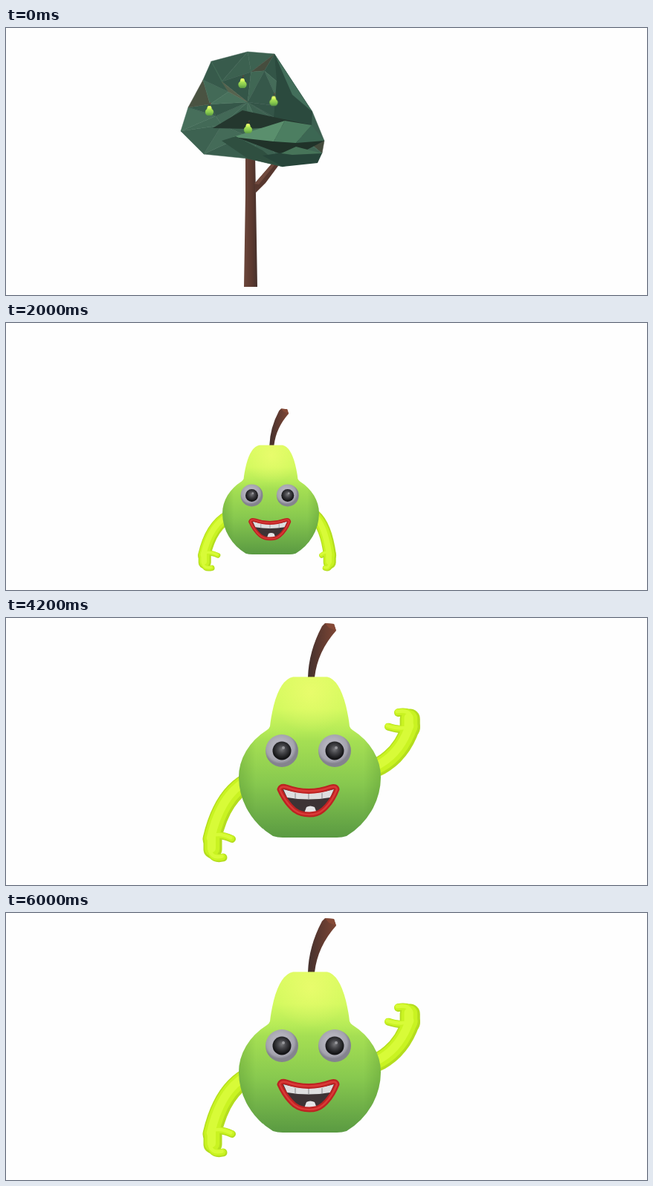
These frames come from a looping animation (862 px wide and 360 px high, 6200 ms). An HTML page:

```html
<!DOCTYPE html>
<html lang="en">
<head>
<meta charset="utf-8">
<title>Pear</title>
<style>
html, body { margin: 0; width: 100%; height: 100%; overflow: hidden; background: #fefefe; }
svg { display: block; width: 862px; height: 360px; }
.arm { fill: none; stroke-linecap: round; stroke-linejoin: round; }
</style>
</head>
<body>
<svg viewBox="0 0 862 360">
  <defs>
    <linearGradient id="skin" gradientUnits="userSpaceOnUse" x1="0" y1="79" x2="0" y2="296">
      <stop offset="0" stop-color="#d9fb60"/>
      <stop offset=".2" stop-color="#d2f95e"/>
      <stop offset=".34" stop-color="#b5ea57"/>
      <stop offset=".4" stop-color="#a5df53"/>
      <stop offset=".66" stop-color="#88c94f"/>
      <stop offset="1" stop-color="#5a9a42"/>
    </linearGradient>
    <linearGradient id="edge" gradientUnits="userSpaceOnUse" x1="313" y1="0" x2="504" y2="0">
      <stop offset="0" stop-color="#3d7a20" stop-opacity=".25"/>
      <stop offset=".12" stop-color="#3d7a20" stop-opacity="0"/>
      <stop offset=".88" stop-color="#3d7a20" stop-opacity="0"/>
      <stop offset="1" stop-color="#3d7a20" stop-opacity=".25"/>
    </linearGradient>
    <radialGradient id="glow" gradientUnits="userSpaceOnUse" cx="410" cy="100" r="55">
      <stop offset="0" stop-color="#f4fd74" stop-opacity=".6"/>
      <stop offset="1" stop-color="#f4fd74" stop-opacity="0"/>
    </radialGradient>
    <linearGradient id="wood">
      <stop offset="0" stop-color="#43302d"/>
      <stop offset=".45" stop-color="#5f3a30"/>
      <stop offset="1" stop-color="#7d4635"/>
    </linearGradient>
    <linearGradient id="bark">
      <stop offset="0" stop-color="#6b463b"/>
      <stop offset=".6" stop-color="#5b392f"/>
      <stop offset="1" stop-color="#44302b"/>
    </linearGradient>
    <radialGradient id="white" cx=".45" cy=".4">
      <stop offset=".5" stop-color="#b3b2bc"/>
      <stop offset=".85" stop-color="#a3a2ad"/>
      <stop offset="1" stop-color="#84838e"/>
    </radialGradient>
    <radialGradient id="pupil" cx=".5" cy=".42">
      <stop offset="0" stop-color="#77777a"/>
      <stop offset=".45" stop-color="#444448"/>
      <stop offset="1" stop-color="#151517"/>
    </radialGradient>
    <path id="body" d="M386 79.5H432Q448 83 457 118Q461 135 462 146Q463 149 466 151A95.5 80 0 0 1 504 215A95.5 94 0 0 1 458 294Q452 296 445 296H372Q365 296 359 294A95.5 94 0 0 1 313 215A95.5 80 0 0 1 351 151Q354 149 355 146Q356 135 360 118Q369 83 386 79.5Z"/>
    <path id="lips" d="M368 231Q370 226 377 228Q407 239 437 228Q444 226 445 231Q438 249 426 259Q419 265 408 265Q396 265 388 259Q376 249 368 231Z"/>
    <g id="pear" transform="translate(-408.5 -296)">
      <path d="M406 80Q407 45 425 11L429 7L441 8L444 17Q419 45 415 80Z" fill="url(#wood)"/>
      <path d="M429 7L441 8L444 17L434 13Z" fill="#854936"/>
      <use href="#body" fill="url(#skin)"/>
      <use href="#body" fill="url(#edge)"/>
      <use href="#body" fill="url(#glow)"/>
    </g>
    <g id="eye">
      <circle r="22" fill="url(#white)"/>
      <circle r="12.5" fill="url(#pupil)"/>
      <circle cx="2" cy="-4" r="2" fill="#98989c"/>
    </g>
  </defs>

  <g id="tree">
    <path d="M322 170H335L336 225L338 349H320L322 225Z" fill="url(#bark)"/>
    <path d="M334 210L360 180L369 182L349 209L336 222Z" fill="#57372e"/>
    <path d="M334 210L360 180L364 181L340 211Z" fill="#70493d"/>
    <g id="crown"></g>
    <path d="M361 35L412 113L411 131L360 123L364 70Z" fill="#2b4a3e"/>
    <path d="M361 35L412 113L385 90Z" fill="#426e5a"/>
    <path d="M278 135L318 111L411 131L325 136Z" fill="#24372e"/>
    <path d="M309 147L360 150L428 152L405 164L370 170Z" fill="#203229"/>
    <path d="M305 147L375 125L360 153Z" fill="#5a8f6d"/>
    <path d="M375 125L411 131L390 155L360 153Z" fill="#4c7e61"/>
    <path d="M411 131L428 152L390 155Z" fill="#3c6753"/>
    <path d="M290 152L309 146L345 165L372 187L325 176Z" fill="#2f4f40"/>
    <path d="M345 172L372 168L425 169L419 182L372 187Z" fill="#27453a"/>
    <path d="M370 169L390 160L425 169L385 171Z" fill="#477459"/>
    <use href="#pear" transform="translate(318 81) scale(.06)"/>
    <use href="#pear" transform="translate(273.5 118) scale(.06)"/>
    <use href="#pear" transform="translate(325.5 142) scale(.06)"/>
  </g>

  <g id="hero">
    <g id="arms" class="alive arm" transform="translate(-408.5 -296)"></g>
    <use href="#pear"/>
    <g class="alive" transform="translate(-408.5 -296)">
      <use href="#eye" x="371" y="179"/>
      <use href="#eye" x="442" y="179"/>
      <use href="#lips" fill="#3d3335"/>
      <path d="M373 231Q407 241 441 231L436 242Q407 247 378 242Z" fill="#dededf"/>
      <path d="M389 236V244M407 237V245M425 236V244" stroke="#88878a"/>
      <path d="M401 263L404 255Q409 252 415 255L418 263Z" fill="#e4e4e6"/>
      <use href="#lips" fill="none" stroke="#bd2222" stroke-width="7" stroke-linejoin="round"/>
      <use href="#lips" fill="none" stroke="#d93a37" stroke-width="2.5"/>
    </g>
  </g>
</svg>
<script>
const $ = id => document.getElementById(id);
const LOOP = 6200, STEP = 200;

const mix = (a, b, u) => a + (b - a) * u;
const ramp = (t, from, to) => Math.min(1, Math.max(0, (t - from) / (to - from)));
const smooth = u => u * u * (3 - 2 * u);

let seed = 5;
const rand = () => (seed = seed * 16807 % 2147483647) / 2147483647;

// Crown: triangles between the outline, a jittered inner ring and the centre
function drawCrown() {
  const outer = '276,45 325,32 361,35 412,113 428,152 425,169 372,187 325,176 266,170 235,139 245,107 265,70'
    .split(' ').map(p => p.split(',').map(Number));
  const hub = [325, 100];
  const inner = outer.map(p => p.map((v, k) => mix(hub[k], v, .55) + rand() * 16 - 8));
  const facet = (...pts) => {
    const x = pts.reduce((sum, p) => sum + p[0], 0) / 3;
    const u = .75 * rand() + .25 * ramp(x, 400, 240), warm = rand() < .25 ? 14 : 0;
    const c = `rgb(${mix(46, 76, u) + warm},${mix(78, 118, u) - warm},${mix(66, 96, u) - warm})`;
    return `<polygon points="${pts.join(' ')}" fill="${c}" stroke="${c}" stroke-width=".5"/>`;
  };
  $('crown').innerHTML = outer.map((a, i) => {
    const j = (i + 1) % outer.length;
    return facet(a, outer[j], inner[i]) + facet(outer[j], inner[j], inner[i]) + facet(inner[i], inner[j], hub);
  }).join('');
}

// side: -1 left, 1 right; spread: reach outwards; drop: 1 hangs, -1 points up
function arm(side, spread, drop) {
  const at = (x, y) => [408.5 + side * (95.5 + x * spread), 212 + y * drop];
  const near = 1 - Math.abs(drop);
  const parts = [
    [`M${at(-18, 6)}Q${at(22, 24)} ${at(36, 86)}`, 25],
    [`M${at(35, 84)}L${at(35, 100)}`, 25 + 9 * near],
    [`M${at(30, 82)}Q${at(22, 80)} ${at(9, 86)}`, 10],
    [`M${at(37, 104)}Q${at(34, 114)} ${at(21, 111)}`, 11],
  ];
  const layer = (color, thin, shift) => parts.map(([d, w]) =>
    `<path d="${d}" stroke="${color}" stroke-width="${w * thin}" transform="translate(${shift} ${shift})"/>`).join('');
  return layer('#b4dd1e', 1, 0) + layer('#c9f322', .8, -.8) + layer('#d8fb38', .45, -1.6);
}

// Keys are [time, x, y, scale]
const place = [[200, 360, 105, .06], [1400, 415.5, 338, .058], [2000, 356, 312, .68], [2400, 408.5, 296, 1]];
function track(keys, t) {
  let i = 0;
  while (i < keys.length - 2 && t >= keys[i + 1][0]) i++;
  const [a, b] = [keys[i], keys[i + 1]];
  const u = smooth(ramp(t, a[0], b[0]));
  return a.slice(1).map((v, k) => mix(v, b[k + 1], u));
}

function draw(t) {
  const [x, y, s] = track(place, t);
  $('hero').setAttribute('transform', `translate(${x} ${y}) scale(${s})`);
  $('tree').setAttribute('opacity', 1 - smooth(ramp(t, 600, 1400)));
  const life = ramp(t, 1400, 1800);
  document.querySelectorAll('.alive').forEach(g => g.setAttribute('opacity', life));

  const swing = ramp(t, 2200, 3000);
  const spread = mix(.6, 1.12, Math.min(1, 2 * swing));
  $('arms').innerHTML = arm(-1, 1, 1) + arm(1, spread, mix(1, -.76, smooth(swing)));
}

drawCrown();
const start = performance.now();
function tick() {
  const t = (performance.now() - start) % LOOP;
  draw(Math.floor(t / STEP) * STEP);
  requestAnimationFrame(tick);
}
tick();
</script>
</body>
</html>
```
